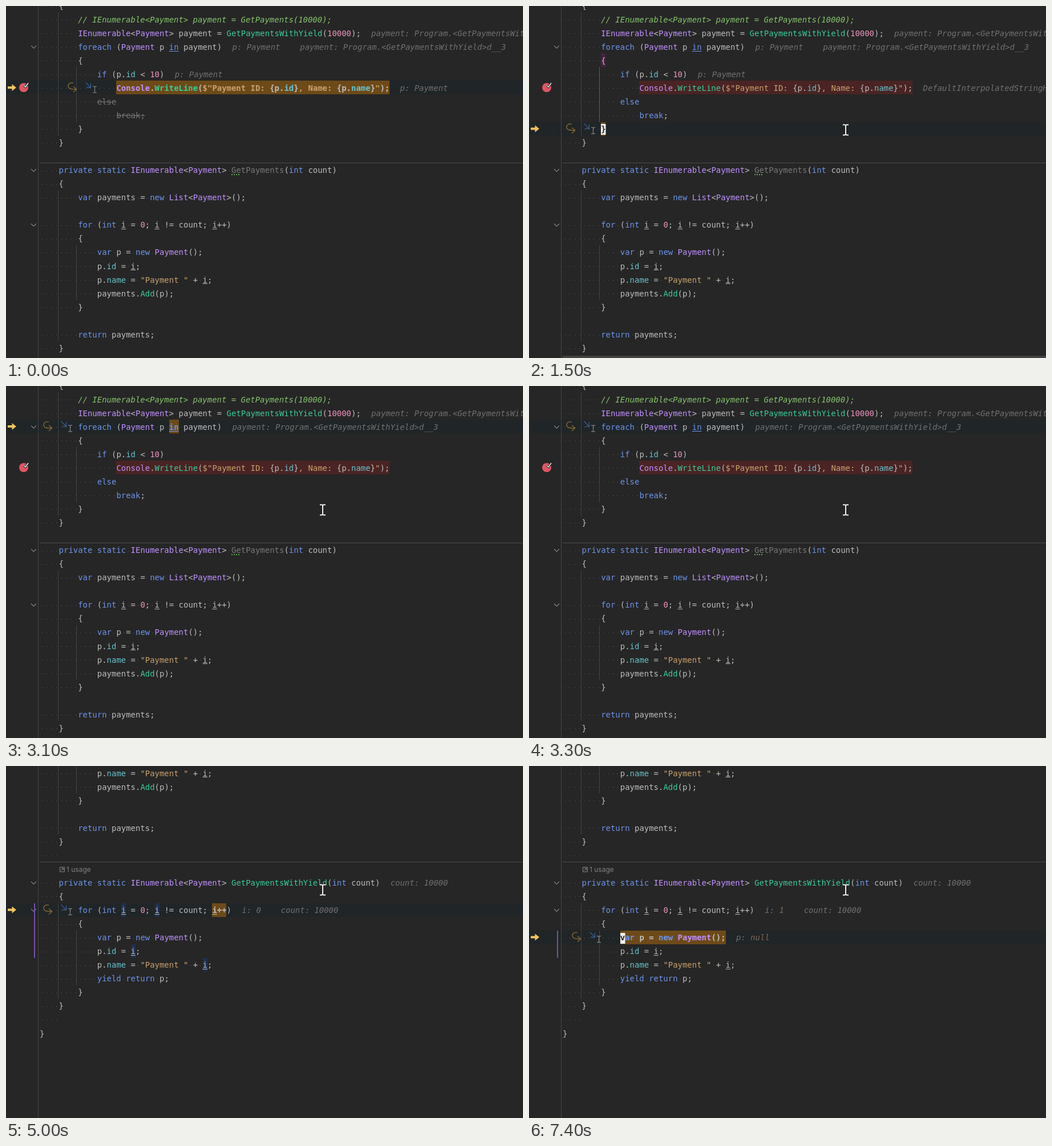
These frames come from a looping animation (906x618 px, 8000 ms). An HTML page with a canvas:

```html
<!DOCTYPE html>
<html lang="en">
<head>
<meta charset="utf-8">
<title>Stepping through a generator</title>
<style>
html, body { margin: 0; width: 100%; height: 100%; overflow: hidden; background: #262626; }
canvas { display: block; }
</style>
</head>
<body>
<canvas id="stage" width="906" height="618"></canvas>
<script>
const ctx = document.getElementById('stage').getContext('2d');
const W = 906, H = 618, LOOP = 8000;
const CHAR = 8.4, LINE = 24.05, LEFT = 59;
const MONO = '13.95px "DejaVu Sans Mono", monospace';

// The first line is row -1, half hidden above the top edge.
const code = `    {
        // IEnumerable<Payment> payment = GetPayments(10000);
        IEnumerable<Payment> payment = GetPaymentsWithYield(10000);
        foreach (Payment p in payment)
        {
            if (p.id < 10)
                Console.WriteLine($"Payment ID: {p.id}, Name: {p.name}");
            else
                break;
        }
    }

    private static IEnumerable<Payment> GetPayments(int count)
    {
        var payments = new List<Payment>();

        for (int i = 0; i != count; i++)
        {
            var p = new Payment();
            p.id = i;
            p.name = "Payment " + i;
            payments.Add(p);
        }

        return payments;
    }
    ${''}

    private static IEnumerable<Payment> GetPaymentsWithYield(int count)
    {
        for (int i = 0; i != count; i++)
        {
            var p = new Payment();
            p.id = i;
            p.name = "Payment " + i;
            yield return p;
        }
    }
    ${''}
}`.split('\n');

const TOKEN = /\/\/.*|(?<=\})(?:, Name: |")|\$?"[^"{]*"?|\w+|./g;
const COLORS = [
  [/^\/\//, '#85c46c'],
  [/^(\$?"|, Name)/, '#c9a26d'],
  [/^(foreach|for|in|if|else|break|private|static|int|var|new|return|yield)$/, '#6c95eb'],
  [/^(IEnumerable|Payment|List|Console)$/, '#c191ff'],
  [/^(GetPaymentsWithYield|WriteLine|Add)$/, '#39cc9b'],
  [/^GetPayments$/, '#787878'],
  [/^(id|name)$/, '#66c3cc'],
  [/^\d+$/, '#ed94c0'],
  [/./, '#bdbdbd']
];
const lines = code.map(text => [...text.matchAll(TOKEN)].map(m => ({
  text: m[0], col: m.index, color: COLORS.find(([re]) => re.test(m[0]))[1]
})));

// Inline debugger values; a leading * marks a value that just changed.
const source = 'payment: Program.<GetPaymentsWithYield>d__3';
const P = 'p: Payment', N = 'count: 10000';
const outer = { 1: [source], 2: [P, source], 4: [P], 5: [P] };
const inner = i => ({ 27: [N], 29: [i, N] });

const ORANGE = '#6d4a18', GREEN = '#2b4220';
const exec = (row, col, len, iconX = 65, color = ORANGE) =>
  ({ row, col, arrow: row, iconX, swoop: true, exec: { row, col, len, color }, caret: true, match: null });

const steps = [
  [0, { ...exec(5, 16, 57, 108), caret: false, scroll: 0, hints: outer, struck: true, mouse: null,
        badge: 0, bulb: false, scrollbar: false, bar: null, uses: false, inlay: false }],
  [100, { mouse: [688, 264] }],
  [200, { row: 10, col: 0, caret: true, iconX: 60, swoop: false }],
  [600, { bulb: true }],
  [800, { mouse: [621, 240] }],
  [900, { mouse: [556, 217.5], badge: 0.88 }],
  [1000, { mouse: [555, 217.5], badge: 1 }],
  [1200, { ...exec(8, 8, 1), match: [3, 8], bulb: false, badge: 0 }],
  [1500, { hints: { ...outer, 5: ['DefaultInterpolatedStringHandler.ToStringAndClear()'] }, struck: false, scrollbar: true }],
  [2200, { caret: false }],
  [2300, { ...exec(2, 27, 2), hints: { 1: [source], 2: [source] }, scrollbar: false }],
  [3100, { caret: false }],
  [3300, { exec: null, arrow: null }],
  [3400, { ...exec(35, 8, 1), match: [30, 35], scroll: 468, hints: { 27: [N] } }],
  [3500, { hints: { ...inner('i: 0'), 31: [P], 32: [P, 'i: 0'], 33: [P, 'i: 0'], 34: [P] }, inlay: true }],
  [4100, { caret: false }],
  [4400, { ...exec(29, 36, 3), hints: inner('i: 0'), inlay: false, uses: true, bar: [29, 32] }],
  [5000, { caret: false }],
  [5400, { caret: true }],
  [5900, { caret: false }],
  [6400, { ...exec(29, 24, 10, 65, GREEN), hints: inner('*i: 1') }],
  [6900, { ...exec(30, 8, 1), match: [30, 35], uses: false, bar: [31, 32] }],
  [7300, { ...exec(31, 12, 22, 75), hints: { ...inner('*i: 1'), 31: ['*p: null'] } }]
];

let state;
const rowY = row => 24 + row * LINE - state.scroll;
const rowTop = row => Math.floor(rowY(row) - 12.3);
const colX = col => LEFT + col * CHAR;

function rect(x, y, w, h, color) {
  ctx.fillStyle = color;
  ctx.fillRect(x, y, w, h);
}

function path(d, color, width = 1, fill) {
  const p = new Path2D(d);
  if (fill) { ctx.fillStyle = fill; ctx.fill(p); }
  if (color) { ctx.strokeStyle = color; ctx.lineWidth = width; ctx.stroke(p); }
}

function at(x, y, draw) {
  ctx.save();
  ctx.translate(x, y);
  draw();
  ctx.restore();
}

function text(str, x, y, color, font = MONO) {
  ctx.font = font;
  ctx.fillStyle = color;
  ctx.fillText(str, x, Math.round(y + 4.6));
}

const cell = (row, col, len, color) =>
  rect(Math.round(colX(col)), rowTop(row), Math.round(len * CHAR), 24, color);

// Indent guides sit on a grid of whole-pixel spaces.
const guide = (col, first, last, color = '#434343') =>
  rect(LEFT + col * 8, rowTop(first), 1, rowTop(last + 1) - rowTop(first), color);

function drawBackdrop() {
  const { row, match, uses, exec: run } = state;
  rect(0, 0, W, H, '#262626');
  rect(0, rowTop(row), W, 24, '#202527');
  rect(56, 0, 1, H, '#464646');
  for (const r of [10, 25]) rect(LEFT, Math.floor(rowY(r) + 11), W, 1, '#4c4c4c');

  [[4, 0, 8], [8, 4, 7], [4, 13, 23], [8, 17, 20], [4, 29, 35], [8, 31, 34]]
    .forEach(([col, a, b]) => guide(col, a, b, match && a === match[0] + 1 ? '#754a7e' : undefined));

  if (!run || run.row !== 5) cell(5, 16, 57, '#4a2424');
  if (match) match.forEach(r => cell(r, 8, 1, '#47223f'));
  if (uses) [[29, 17], [29, 24], [29, 36], [32, 19], [33, 34]].forEach(([r, c]) => cell(r, c, 1, '#20304d'));
  if (run) cell(run.row, run.col, run.len, run.color);
}

function drawLine(tokens, row) {
  const y = rowY(row);
  if (y < -30 || y > H + 30) return;
  const { exec: run, struck, caret } = state;
  const dead = struck && (row === 6 || row === 7);

  for (const { text: str, col, color } of tokens) {
    const x = colX(col), w = str.length * CHAR;
    if (str === ' ') {
      rect(Math.round(x + 4), Math.round(y), 1, 1, '#606060');
      continue;
    }
    const bold = run && run.row === row && col >= run.col && col < run.col + run.len;
    const ink = dead ? '#787878' : color;
    const slant = str.startsWith('//') ? 'italic ' : '';
    text(str, x, y, ink, (bold ? 'bold ' : slant) + MONO);
    if (dead) rect(x, Math.round(y), w, 1, ink);
    if (str === 'i' || str === 'in') rect(x, Math.round(y + 6.5), w, 1, ink);
    if (str === 'GetPayments')
      for (let k = 0; k < 4; k++) rect(Math.round(x) + k * 4, Math.round(y + 6), 2, 2, '#62a854');
  }

  if (caret && row === state.row) {
    const x = colX(state.col), char = code[row + 1][state.col] || '';
    rect(Math.round(x), Math.round(y - 9), 8.5, 19, '#f0f0f0');
    text(char, x, y, '#202020', 'bold ' + MONO);
  }
  drawHints(row, y);
}

function drawHints(row, y) {
  let x = colX(code[row + 1].length) + 18.3;
  if (row === 29 && state.inlay) {
    ctx.beginPath();
    ctx.roundRect(396, y - 8, 83, 16, 4);
    ctx.fillStyle = '#333333';
    ctx.fill();
    const small = '12px Inter, sans-serif';
    path(`M405.500 ${y - 3}l-3 3.500l3 3.500M467.500 ${y - 3}l3 3.500l-3 3.500`, '#a0a0a0', 1.2);
    text('+0', 418, y, '#6c95eb', small);
    text('+1', 441, y, '#787878', small);
    x = 499;
  }
  for (const hint of state.hints[row] || []) {
    const changed = hint[0] === '*', label = changed ? hint.slice(1) : hint;
    const split = changed ? label.indexOf(' ') + 1 : label.length;
    text(label.slice(0, split), x, y, '#707070', 'italic ' + MONO);
    text(label.slice(split), x + split * CHAR, y, '#806552', 'italic ' + MONO);
    x += label.length * CHAR + 34.8;
  }
}

function drawUsage() {
  const y = rowY(26);
  if (y > H) return;
  at(94, y - 4, () => path('M.5 .5h8v8h-8zM2.500 6.500l4-4M3.500 2.500h3v3', '#8a8a8a'));
  text('1 usage', 106, y, '#808080', '12px Inter, sans-serif');
}

function drawGutter() {
  const { bar, arrow, bulb, iconX, swoop, row } = state;
  for (const r of [2, 11, 15, 27, 29])
    at(48.5, rowY(r), () => path('M-4.500 -2.500L0 2L4.500 -2.500', '#858585', 1.2));

  if (bar) rect(49, rowTop(bar[0]), 2, rowTop(bar[1] + 1) - rowTop(bar[0]), '#7650a8');

  at(31, rowY(5) - 1, () => {
    path('M-8 0a8 8 0 1 0 16 0a8 8 0 1 0 -16 0', null, 0, '#e05563');
    path('M0 -4l3 3l5 -7', '#262626', 3.5);
    path('M0 -4l3 3l5 -7', '#e8e8e8', 1.5);
  });

  if (arrow !== null) at(3, rowY(arrow) - 1, () =>
    path('M0 -2h7.500v-4l7.500 6l-7.500 6v-4H0z', null, 0, '#f5c45b'));

  if (bulb) at(10.5, rowY(10) - 1, () => {
    path('M-2.500 4v-2a5 5 0 1 1 5 0v2z', '#a8a8a8', 1.5, '#555555');
    path('M-2.500 6h5M-1.500 8h3M0 3v-4M-2 -2l2 2l2 -2', '#c0c0c0', 1.2);
  });

  at(iconX, rowY(row) - 1, () => {
    if (swoop) path('M10 -8C3 -10 -1 -4 2 0C4 3 8 3 15 3M10 -2l5.500 5l-5.500 5', '#87692f', 1.4);
    path('M31.500 -9l9 9M40.500 -7.500v7.500h-7.500', '#365c99', 1.4);
    path('M44 -2h2.500l1 1l1 -1h2.500M47.500 -1v9M44 9h2.500l1 -1l1 1h2.500', '#858585', 1.2);
  });
}

function drawOverlay() {
  const { scrollbar, badge, mouse } = state;
  if (scrollbar) rect(LEFT, 614, W, 4, '#424242');

  if (badge) at(590, 138, () => {
    ctx.globalAlpha = badge;
    ctx.beginPath();
    ctx.roundRect(0, 0, 44, 39, 6);
    ctx.fillStyle = '#4098d2';
    ctx.fill();
    text('En', 7, 19.5, '#ffffff', 'bold 12px Inter, sans-serif');
    path('M31 16a4.500 4.500 0 1 0 5 7a4.500 4.500 0 0 1 -5 -7z', '#ffffff', 1.2);
  });

  if (mouse) at(...mouse, () => {
    const beam = 'M-5 -9h3.500l1.500 1l1.500 -1h3.500M0 -8v16M-5 9h3.500l1.500 -1l1.500 1h3.500';
    path(beam, '#1c1c1c', 3.5);
    path(beam, '#f4f4f4', 2);
  });
}

function draw() {
  const time = performance.now() % LOOP;
  state = Object.assign({}, ...steps.filter(([start]) => start <= time).map(([, change]) => change));
  drawBackdrop();
  drawGutter();
  lines.forEach((tokens, i) => drawLine(tokens, i - 1));
  drawUsage();
  drawOverlay();
  requestAnimationFrame(draw);
}
draw();
</script>
</body>
</html>
```
